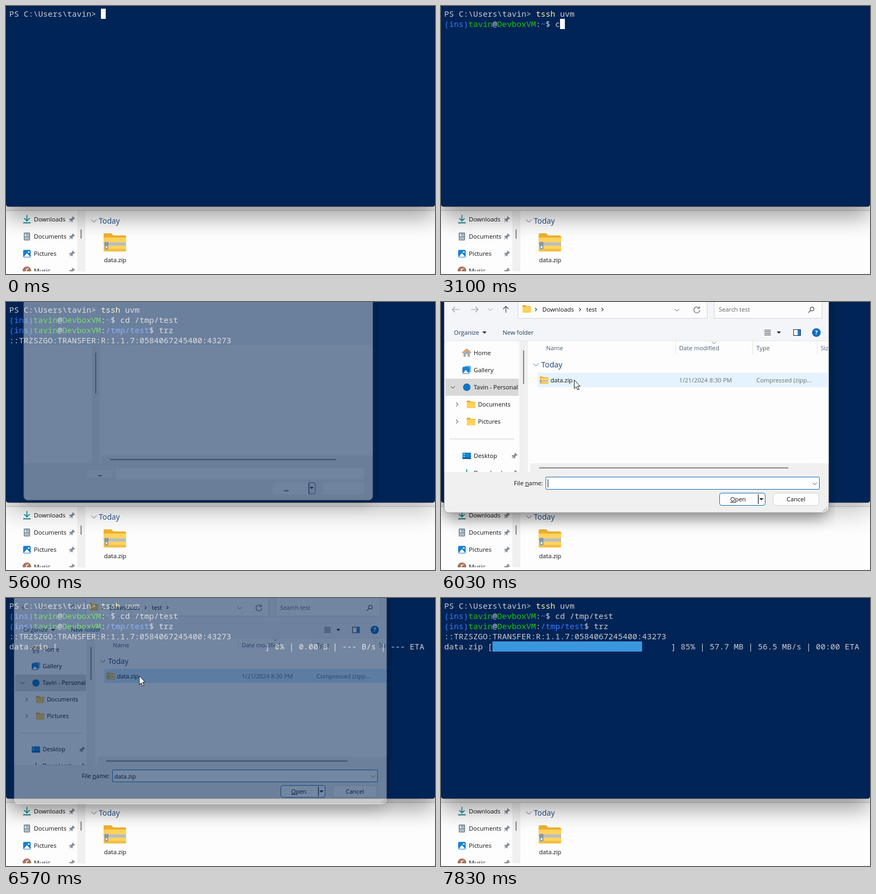
An HTML page that plays this animation: 800 by 500 pixels, repeating every 8000 ms.

```html
<!DOCTYPE html>
<html lang="en">
<head>
<meta charset="utf-8">
<title>File upload over a terminal</title>
<style>
html, body { margin: 0; width: 100%; height: 100%; overflow: hidden; background: #fdfdfd; }
svg { display: block; width: 100%; height: 100%; }
text { white-space: pre; }
.ui { font-family: "Open Sans", "Noto Sans", sans-serif; font-size: 11.3px; }
.mono { font-family: "Noto Sans Mono", "DejaVu Sans Mono", monospace; font-size: 15px; font-weight: 500; }
</style>
</head>
<body>
<svg id="stage" viewBox="0 0 800 500"></svg>
<script>
const LOOP = 8000, CELL = 9, LEFT = 6, ROW = 19;
const GREY = '#cccccc', BLUE = '#3b78ff', GREEN = '#16c60c', YELLOW = '#f9f1a5';
const USER = 'tavin', HOST = 'DevboxVM';

// Shape helpers
const rect = (x, y, w, h, fill, more = '') =>
  `<rect x="${x}" y="${y}" width="${w}" height="${h}" fill="${fill}" ${more}/>`;
const line = (d, color, width = 1, more = '') =>
  `<path d="${d}" fill="none" stroke="${color}" stroke-width="${width}" ${more}/>`;
const shape = (d, fill, more = '') => `<path d="${d}" fill="${fill}" ${more}/>`;
const label = (x, y, s, fill = '#111', more = '') =>
  `<text x="${x}" y="${y}" fill="${fill}" ${more}>${s}</text>`;
const at = (x, y, body, scale = 1) =>
  `<g transform="translate(${x} ${y}) scale(${scale})">${body}</g>`;
const group = (id, body, more = '') => `<g id="${id}" ${more}>${body}</g>`;
const down = (x, y, r, color) => line(`M${x - r} ${y - r / 2}l${r} ${r}l${r} ${-r}`, color);
const right = (x, y, r, color) => line(`M${x - r / 2} ${y - r}l${r} ${r}l${-r} ${r}`, color, 1.2);
const arrowDown = (x, y) => shape(`M${x - 4} ${y - 2}h8l-4 4z`, '#222');

// Icons, each drawn around its centre unless noted
const pin = (x, y) => at(x, y, `<g transform="rotate(45)">${
  shape('M-3 -5h6v1.5l-1 .8v3l2 2v1.2h-8v-1.2l2-2v-3l-1-.8z', '#858f98')}${
  line('M0 3v4', '#858f98', 1.2)}</g>`);
const download = (x, y) => at(x, y,
  line('M0 -8V3M-5 -2L0 3L5 -2', '#1a9a96', 1.8) + line('M-7 6.5H7', '#16808c', 2));
const picture = (x, y) => at(x, y,
  rect(-7, -7, 14, 14, '#1c7fd0', 'rx="2"') +
  shape('M-6 6L0 -1L6 6z', '#fff') + `<circle cx="3.5" cy="-3" r="1.6" fill="#fff"/>`);
const gallery = (x, y) => at(x, y,
  rect(-4, -8, 12, 12, '#6bb7ee', 'rx="2"') + rect(-8, -6, 13, 13, '#1c7fd0', 'rx="2"') +
  shape('M-7 6L-2 0L4 6z', '#fff'));
const docIcon = (x, y) => at(x, y,
  rect(-6, -7.5, 12, 15, '#8796a3', 'rx="1.5"') + rect(-4, -4.5, 3, 4, '#e8eef2') +
  line('M0 -4H4M0 -1.5H4M-4 2H4M-4 4.5H4', '#e8eef2', 1.2));
const folder = (x, y) => at(x, y,
  shape('M-8 -6q0 -1 1 -1h5l2 2h7q1 0 1 1v3h-16z', '#e9a92e') +
  rect(-8, -4, 16, 11, '#ffd15c', 'rx="1.2"'));
const home = (x, y) => at(x, y,
  shape('M-6 0V7H-1.5V2H1.5V7H6V0L0 -5z', '#a3adb5') + line('M-8 0L0 -7L8 0', '#df8339', 2));
const desktop = (x, y) => at(x, y,
  rect(-8, -6, 16, 12, '#1683cf', 'rx="1.5"') +
  rect(-6, -4, 2, 2, '#bfe6ff') + rect(-6, 0, 2, 2, '#bfe6ff') + rect(-8, 3, 16, 3, '#0f62a8'));
// Top-left corner at x, y
const zip = (x, y, scale) => at(x, y,
  shape('M0 3q0 -3 3 -3h10q2 0 3 2l2 2h21q3 0 3 3v10h-42z', '#eeb12e') +
  rect(0, 8, 42, 26, '#ffd35f', 'rx="2"') + rect(0, 29, 42, 5, '#f5bf45', 'rx="2"') +
  rect(0, 17, 42, 6, '#d9dde0') +
  line('M0 18.5H42M1 21.5H42', '#5d666d', 1.6, 'stroke-dasharray="1.5 1.5"') +
  rect(2, 16, 7, 14, '#8d979e', 'rx="1.5"') + rect(4, 24, 3, 4, '#f4f6f7'), scale);

function explorer() {
  const items = [['Downloads', 398, download], ['Documents', 430, docIcon], ['Pictures', 462, picture]];
  return rect(0, 370, 800, 130, '#fdfdfd') + rect(0, 370, 800, 11, '#f0f0f0') +
    rect(0, 381, 800, 1, '#c4c4c4') +
    `<g class="ui" clip-path="url(#pane)">` +
    rect(133, 382, 15, 113, '#f0f0f0') + rect(139, 417, 2, 17, '#858585') +
    items.map(([s, y, icon]) => icon(39, y) + label(52, y + 4, s) + pin(123, y)).join('') +
    `<circle cx="39" cy="494" r="8" fill="#a9745c"/>` + line('M38 497v-6l4 -1', '#fff', 1.5) +
    label(52, 498, 'Music') + pin(123, 494) +
    down(164, 401, 5, '#50637d') + label(173, 406, 'Today', '#1c4a86', 'font-size="14.2"') +
    zip(182, 424, 1) + label(203.5, 478, 'data.zip', '#111', 'text-anchor="middle"') + `</g>`;
}

function dialogTop() {
  const boxed = 'stroke="#d3d6da"', dark = '#444', dim = '#9a9a9a';
  return rect(143.5, -10, 353, 40.5, '#fcfcfd', boxed) + rect(509.5, -10, 201, 40.5, '#fcfcfd', boxed) +
    line('M34 14H21M26 9L21 14L26 19M56 14H69M64 9L69 14L64 19', dim, 1.2) + down(92, 14, 4, dim) +
    line('M121 20V8M116 13L121 8L126 13', dark, 1.2) +
    folder(160, 13) + right(177, 14, 3, dark) + label(189, 18, 'Downloads') + right(259, 14, 3, dark) +
    label(271, 18, 'test') + right(301, 14, 3, dark) + down(440, 15, 4, '#666') +
    line('M481 11A5.5 5.5 0 1 0 482.500 15M482 8V12H478', '#666', 1.2) +
    label(518, 18, 'Search test', '#666') +
    `<circle cx="692" cy="13" r="3.5" fill="none" stroke="#555" stroke-width="1.3"/>` +
    line('M689.500 15.500L685 20', '#555', 1.5) +
    label(24, 61, 'Organize', '#1e395b') + arrowDown(81, 57) + label(115, 61, 'New folder', '#1e395b') +
    line('M603 52.500H615M603 55.500H615M603 58.500H615M603 61.500H615', '#333') + arrowDown(630, 57) +
    rect(657.5, 51.5, 13, 11, '#fff', 'stroke="#222"') + rect(665, 52, 5, 10, '#1683d8') +
    `<circle cx="700" cy="57" r="8" fill="#0f6cbd"/>` +
    label(700, 61, '?', '#fff', 'text-anchor="middle" font-weight="700"');
}

function sidebar() {
  const sub = (s, y) => right(30, y, 3.5, '#777') + folder(56, y) + label(69, y + 4, s);
  return `<g clip-path="url(#nav)">` + rect(8, 143, 137, 32, '#d9d9d9') +
    home(48, 95) + label(61, 99, 'Home') + gallery(48, 127) + label(61, 131, 'Gallery') +
    down(22, 159, 4, '#333') + `<circle cx="48" cy="159" r="7" fill="#1272c4"/>` +
    label(61, 163, 'Tavin - Personal') + sub('Documents', 191) + sub('Pictures', 223) +
    rect(16, 255, 121, 1, '#d0d0d0') + desktop(48, 287) + label(61, 291, 'Desktop') + pin(137, 287) +
    download(48, 320) + label(61, 323, 'Downloads') + pin(137, 319) + `</g>`;
}

function fileList() {
  const head = [[196, 'Name'], [444, 'Date modified'], [588, 'Type'], [708, 'Size']];
  return `<g clip-path="url(#list)">` +
    head.map(([x, s]) => label(x, 90, s, '#4c607a')).join('') +
    [437, 581, 701].map(x => rect(x, 73, 1, 25, '#e2e2e2')).join('') + down(509, 76, 4, '#777') +
    down(177, 117, 5, '#50637d') + label(187, 122, 'Today', '#1c3f78', 'font-size="14.2"') +
    rect(180, 132, 543, 27, 'none', 'id="row"') + zip(184, 139, .39) + label(204, 150, 'data.zip') +
    label(444, 150, '1/21/2024 8:30 PM', '#6d6d6d') + label(588, 150, 'Compressed (zipp...', '#6d6d6d') + `</g>`;
}

function dialogFooter() {
  const u = s => `<tspan text-decoration="underline">${s}</tspan>`;
  const mid = 'text-anchor="middle"', accent = 'stroke="#0f67b0"';
  return label(190, 342, `File ${u('n')}ame:`, '#111', 'text-anchor="end"') +
    rect(195.5, 326.5, 510, 23, '#fff', accent + ' rx="1"') + down(697, 339, 4, '#555') +
    label(199, 343, '', '#111', 'id="fileName"') + rect(199, 331, 1, 15, '#000', 'id="caret"') +
    rect(519.5, 356.5, 85, 23, '#fdfdfd', accent + ' rx="4"') + label(554, 372, u('O') + 'pen', '#111', mid) +
    rect(591, 359, 1.3, 18, '#222') + arrowDown(597.5, 368) +
    rect(619.5, 356.5, 85, 23, '#fdfdfd', 'stroke="#d0d0d0" rx="4"') + label(662, 372, 'Cancel', '#111', mid) +
    line('M712 390H721M715 387H721M718 384H721', '#b0b0b0', 2, 'stroke-dasharray="2 1"');
}

function dialog() {
  const bare = rect(136, 331, 54, 15, '#fafafa') + rect(195, 327, 510, 23, '#fdfdfd') +
    rect(518, 356, 74, 25, '#fbfbfb') + rect(619, 356, 86, 25, '#fbfbfb') +
    rect(159, 342, 7, 1.3, '#111') + rect(541, 373, 9, 1.3, '#111') +
    line('M591 357H601Q605 357 605 361V376Q605 380 601 380H591', '#0f67b0') +
    rect(591, 358, 1.3, 21, '#222') + arrowDown(597.5, 368);
  return rect(10, -40, 709, 443, '#000', 'rx="10" opacity=".4" filter="url(#soft)" clip-path="url(#halo)"') +
    rect(6, -30, 717, 423, '#f0f0f0', 'rx="8" stroke="#8c8c8c" stroke-width=".8"') +
    rect(6.5, -20, 716, 93, '#f3f5f9') + rect(6.5, 72, 716, 1, '#e5e5e5') +
    rect(6.5, 73, 139.5, 244, '#fdfdfd') + rect(162, 73, 560.5, 228, '#fdfdfd') +
    rect(162, 301, 4, 16, '#fdfdfd') +
    rect(183, 308.5, 465, 2, '#808080', 'rx="1"') + rect(153, 90, 2, 63, '#808080', 'id="thumb" rx="1"') +
    group('bare', bare) + group('full', dialogTop() + sidebar() + fileList() + dialogFooter());
}

const clip = (id, x, y, w, h) => `<clipPath id="${id}">${rect(x, y, w, h, '#000')}</clipPath>`;
document.getElementById('stage').innerHTML = `<defs>
  <filter id="blur" x="-20%" y="-30%" width="140%" height="160%"><feGaussianBlur stdDeviation="20"/></filter>
  <filter id="soft" x="-20%" y="-20%" width="140%" height="150%"><feGaussianBlur stdDeviation="14"/></filter>
  ${clip('pane', 0, 375, 800, 120)}${clip('nav', 8, 73, 137, 244)}${clip('list', 166, 73, 556.5, 228)}
  ${clip('halo', -6, -60, 741, 533)}</defs>` +
  explorer() +
  rect(0, 100, 800, 295, '#000', 'id="shade" filter="url(#blur)"') +
  shape('M0 0H800V369Q800 374 795 374H5Q0 374 0 369z', '#012456', 'stroke="#0a1730" stroke-width=".8"') +
  group('term', '', 'class="mono"') + group('dialog', dialog(), 'class="ui"') +
  group('mouse', shape('M0 0V16L3.700 12.600L6.300 18.500L8.900 17.400L6.300 11.600H11z', '#fff',
    'stroke="#111" stroke-width="1" stroke-linejoin="round"'), 'transform="translate(248.500 145.500)"');

const $ = id => document.getElementById(id);
const show = (id, on) => $(id).setAttribute('display', on ? 'inline' : 'none');
const typed = (s, t, start, step) => s.slice(0, Math.max(0, Math.floor((t - start) / step) + 1));
const prompt = path => [['(ins)', BLUE], [USER, GREEN], ['@', GREY], [HOST, GREEN], [':', GREY], [path, BLUE], ['$ ', GREY]];

// Time, bar cells filled, bar cells, percent, done, speed, time left
const steps = [
  [6500, 0, 43, 0, '0.00 B', '--- B/s', '---'],
  [6630, 7, 37, 20, '13.6 MB', '45.2 MB/s', '00:01'],
  [6930, 16, 37, 44, '29.9 MB', '49.8 MB/s', '00:01'],
  [7230, 20, 37, 55, '37.4 MB', '41.5 MB/s', '00:01'],
  [7530, 24, 37, 66, '44.9 MB', '46.3 MB/s', '00:00'],
  [7830, 31, 37, 85, '57.7 MB', '56.5 MB/s', '00:00']
];

function terminalRows(t) {
  const cmd = typed('tssh uvm', t, 500, 200);
  const rows = [[[`PS C:\\Users\\${USER}> `, GREY], [cmd.slice(0, 4), YELLOW], [cmd.slice(4), GREY]]];
  if (t >= 2400) rows.push([]);
  if (t >= 2600) rows[1] = [...prompt('~'), [typed('cd /tmp/test', t, 3100, 100), GREY]];
  if (t >= 4300) rows.push([...prompt('/tmp/test'), [typed('trz', t, 4800, 200), GREY]]);
  if (t >= 5400) rows.push([['::TRZSZGO:TRANSFER:R:1.1.7:0584067245400:43273', GREY]]);
  return rows;
}

function drawTerminal(t) {
  let out = '', rows = terminalRows(t), col = 0;
  const write = (s, c, r, color) => {
    if (s.trim()) out += label(LEFT + c * CELL, 20 + r * ROW, s.replace(/>/g, '&gt;'), color);
  };
  rows.forEach((row, r) => {
    col = 0;
    for (const [s, color] of row) { write(s, col, r, color); col += s.length; }
  });
  if (t < 5400) out += rect(LEFT + col * CELL, 5 + (rows.length - 1) * ROW, CELL, ROW, '#fff');
  const step = steps.filter(s => t >= s[0]).pop();
  if (step) {
    const [, done, size, pct, bytes, speed, eta] = step;
    write('data.zip [', 0, 4, GREY);
    out += rect(LEFT + 10 * CELL, 81, done * CELL, ROW, '#3a96dd');
    write(`] ${pct}% | ${bytes} | ${speed} | ${eta} ETA`, 10 + size, 4, GREY);
  }
  return out;
}

function drawDialog(t) {
  const visible = t >= 5600 && t < 6630;
  show('dialog', visible);
  show('mouse', t >= 5920 && t < 6930);
  if (!visible) return;
  const n = Math.floor((t - 5600) / 53.75), picked = t >= 6230;
  let scale = 1 - .092 * Math.pow(.45, n), alpha = Math.min(1, .44 + n * .26);
  if (t >= 6500) [scale, alpha] = t < 6570 ? [.985, .74] : [.969, .45];
  else if (n > 7) scale = 1;
  const box = $('dialog');
  box.setAttribute('transform', `translate(299 140) scale(${scale}) translate(-299 -140)`);
  box.setAttribute('opacity', alpha);
  show('bare', n < 3);
  show('full', n >= 3);
  $('thumb').setAttribute('height', n < 3 ? 84 : 63);
  $('row').setAttribute('fill', picked ? '#cce8ff' : n > 5 ? '#e5f3ff' : 'none');
  $('fileName').textContent = picked ? 'data.zip' : '';
  show('caret', !picked);
}

let last = '';
function draw(t) {
  const term = drawTerminal(t);
  if (term !== last) $('term').innerHTML = last = term;
  $('shade').setAttribute('opacity', t >= 5400 && t < 6350 ? .2 : .35);
  drawDialog(t);
}

const begin = performance.now();
function tick() {
  draw((performance.now() - begin) % LOOP);
  requestAnimationFrame(tick);
}
tick();
</script>
</body>
</html>
```
